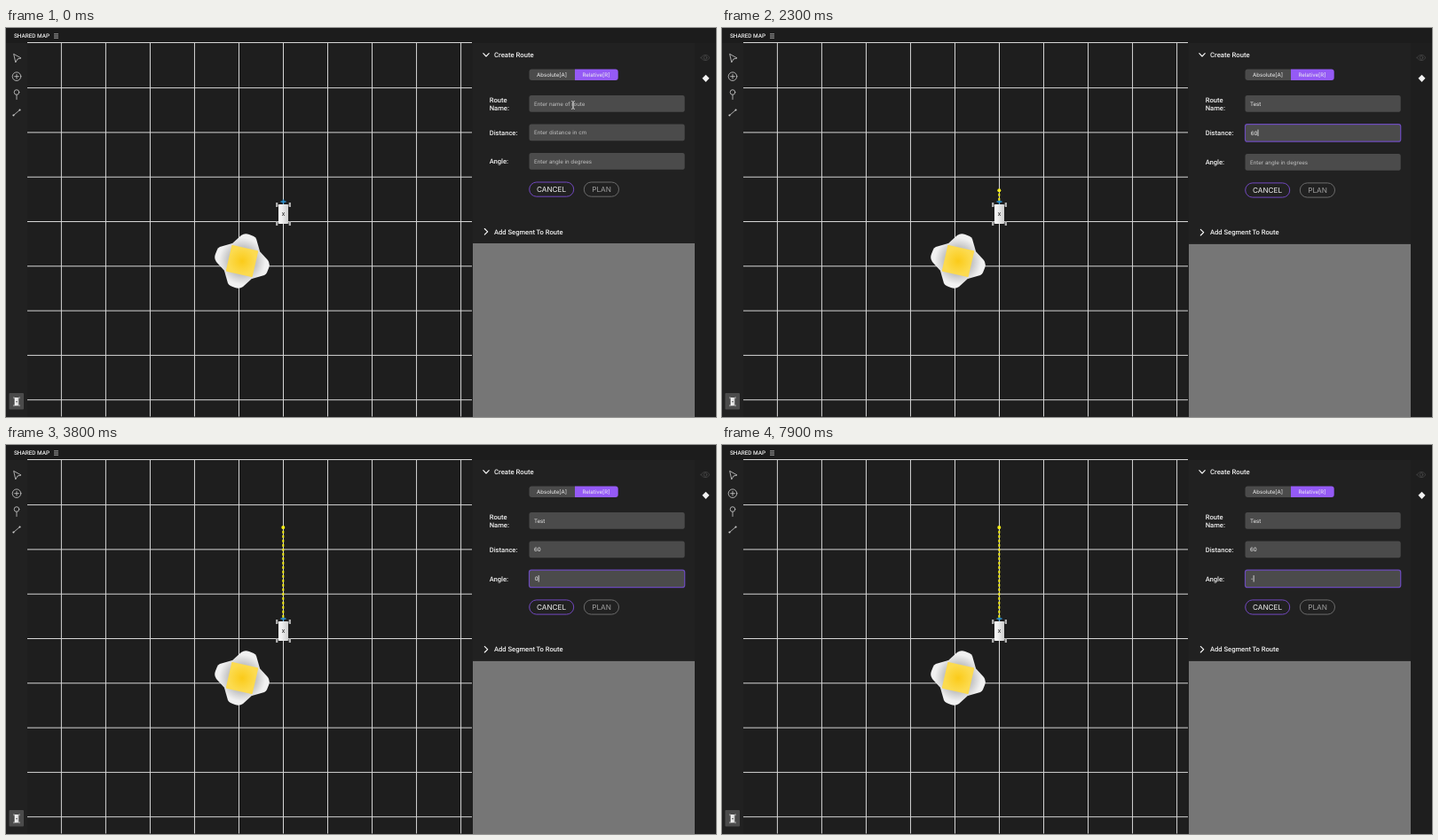
An HTML page that plays this animation: 800x439 px, repeating every 8000 ms.

```html
<!DOCTYPE html>
<html lang="en">
<head>
<meta charset="utf-8">
<title>Route planner</title>
<style>
  html, body { margin: 0; width: 100%; height: 100%; overflow: hidden; background: #1c1c1c; }
  svg { display: block; width: 100vw; height: 100vh; }
  text { fill: #f0f0f0; font: 500 7.6px Roboto, sans-serif; white-space: pre; text-rendering: geometricPrecision; }
  .entry { font: 400 6.15px Inter, sans-serif; }
  .button { font: 400 8.2px Inter, sans-serif; text-anchor: middle; }
  .tab { font: 400 6.1px Inter, sans-serif; text-anchor: middle; }
  .icon { fill: none; stroke: #d0d0d0; stroke-width: .8; stroke-linecap: round; stroke-linejoin: round; }
</style>
</head>
<body>
<svg viewBox="0 0 800 439" preserveAspectRatio="none">
  <defs>
    <radialGradient id="petal" gradientUnits="userSpaceOnUse" cx="0" cy="0" r="31">
      <stop offset=".45" stop-color="#bcbcbc"/><stop offset=".85" stop-color="#f1f1f1"/>
    </radialGradient>
    <radialGradient id="yolk"><stop stop-color="#fbcb19"/><stop offset="1" stop-color="#fcdb50"/></radialGradient>
    <linearGradient id="metal"><stop stop-color="#fff"/><stop offset="1" stop-color="#cfcfcf"/></linearGradient>
    <g id="robot">
      <path d="M-7 -10H7M-7 10H7" stroke="#999"/>
      <path d="M-7.3 -13v5M7.3 -13v5M-7.3 8v5M7.3 8v5" stroke="#b4b4b4" stroke-width="2.2"/>
      <rect x="-5.5" y="-11" width="11" height="22" rx="1" fill="url(#metal)"/>
    </g>
    <path id="leaf" d="M-13 -18L-1 -29Q3 -32 8 -30L13 -28Q15 -27 16 -25L20 -11L0 0Z" fill="url(#petal)"/>
  </defs>

  <rect width="800" height="439" fill="#1c1c1c"/>
  <rect y="17" width="24" height="422" fill="#212121"/>
  <rect x="24" y="17" width="502" height="422" fill="#1e1e1e"/>

  <g id="map">
    <path id="grid" stroke="#d6d6d6" fill="none"/>
    <g transform="translate(266 263)">
      <use href="#leaf"/><use href="#leaf" transform="rotate(90)"/>
      <use href="#leaf" transform="rotate(180)"/><use href="#leaf" transform="rotate(270)"/>
      <rect x="-15.3" y="-15.3" width="30.6" height="30.6" rx="1" fill="url(#yolk)" transform="rotate(13)"/>
    </g>
    <path d="M309.5 196h6M312.5 193.5v5" stroke="#2f94d2" stroke-width="1.6"/>
    <use href="#robot" x="312.5" y="210"/>
    <text x="312.5" y="212" text-anchor="middle" style="font-size:5.5px;fill:#333">X</text>
    <g id="route" fill="#f6ee14">
      <line id="dash" stroke="#f6ee14" stroke-width="2" stroke-dasharray="3 2"/>
      <circle id="dot" r="2"/>
    </g>
  </g>

  <path d="M24 16.5H525" stroke="#d6d6d6"/>
  <rect x="525.5" y="17" width="251" height="422" fill="#212121"/>
  <rect x="776" y="17" width="24" height="422" fill="#1e1e1e"/>
  <text x="9" y="11.3" style="font-size:6.4px">SHARED MAP</text>
  <path d="M54 6.8h5M54 9h5M54 11.2h5" stroke="#ccc" stroke-width=".8"/>

  <g class="icon">
    <path d="M9 29.5L17 34L13 35L11 38.5Z"/>
    <circle cx="12" cy="54.7" r="4.8"/><path d="M9.6 54.7h4.8M12 52.3v4.8"/>
    <circle cx="12" cy="72.5" r="2.8"/><path d="M12 75.5v5"/>
    <path d="M8.5 98.5L15.5 92.5"/><path d="M8.4 98.6h.1M15.5 92.5h.1" stroke-width="2"/>
    <path d="M783 33.5Q788 27 793 33.5Q788 40 783 33.5Z" stroke="#484848"/>
    <circle cx="788" cy="33.5" r="1.8" stroke="#484848"/>
  </g>
  <path d="M788.5 52.7l4 4.1l-4 4.1l-4 -4.1z" fill="#f2f2f2"/>
  <rect x="3.5" y="412" width="16.5" height="18.5" rx="1" fill="#4b4b4b"/>
  <use href="#robot" transform="translate(12 421.7) scale(.42)"/>
  <circle cx="12" cy="421.7" r=".8" fill="#444"/>

  <path class="icon" d="M537.8 28.7L541 32L544.2 28.7" style="stroke:#fff;stroke-width:1.1"/>
  <text x="550" y="33" style="font-size:7.7px">Create Route</text>
  <path d="M641 46.5H592.5a3 3 0 0 0-3 3v6.4a3 3 0 0 0 3 3H641z" fill="#4b4b4b"/>
  <path d="M641 46.5h45.7a3 3 0 0 1 3 3v6.4a3 3 0 0 1-3 3H641z" fill="#955af6"/>
  <text class="tab" x="615" y="54.9">Absolute[A]</text>
  <text class="tab" x="665" y="54.9">Relative[R]</text>

  <g id="rows"></g>
  <g id="foot">
    <rect x="589.7" y="174" width="50" height="16.2" rx="8.1" fill="none" stroke="#7248c0"/>
    <text class="button" x="614.5" y="185.2">CANCEL</text>
    <rect id="planBox" x="651.3" y="174" width="39.2" height="16.2" rx="8.1" fill="none"/>
    <text id="plan" class="button" x="671" y="185.2">PLAN</text>
    <path class="icon" d="M539.3 226.5L542.7 229.8L539.3 233.1" style="stroke:#fff;stroke-width:1.1"/>
    <text x="550" y="232.6">Add Segment To Route</text>
    <rect x="526" y="243" width="250" height="200" fill="#767676"/>
  </g>
  <path id="caret" stroke="#f4f4f4" stroke-width=".8"/>
  <path id="beam" d="M-2 -4.5Q0 -4.5 0 -3V3Q0 4.5 -2 4.5M2 -4.5Q0 -4.5 0 -3V3Q0 4.5 2 4.5" fill="none" stroke="#c9c9c9" stroke-width=".9"/>
  <path id="arrow" d="M0 0V8L1.9 6.3L3.2 9L4.5 8.4L3.3 5.8H5.8Z" fill="#080808" stroke="#ddd" stroke-width=".7"/>
</svg>

<script>
const LOOP = 8000;
const $ = id => document.getElementById(id);
const set = (el, attrs) => { for (const k in attrs) el.setAttribute(k, attrs[k]); };
const at = (steps, t) => steps.filter(s => s[0] <= t).pop()[1];

// Each list holds [start time, value]
const focusSteps = [[0, -1], [100, 0], [2000, 1], [2800, 2]];
const typed = [
  [[0, ''], [500, 'T'], [600, 'Te'], [700, 'Tes'], [800, 'Test']],
  [[0, ''], [2200, '6'], [2300, '60']],
  [[0, ''], [2900, '3'], [3200, '30'], [3600, '3'], [3800, '0'], [4000, '3'], [4200, '39'],
   [6000, '3'], [6400, '0'], [7000, ''], [7900, '-']]
];
const lengths = [[0, 0], [2300, 11.5], [2400, 101.8]];
const angles = [[0, 0], [3000, 3], [3200, 30], [3600, 3], [3800, 0], [4000, 3], [4200, 39], [6000, 3], [6400, 0]];
const planReady = [[0, false], [2900, true], [3800, false], [4000, true], [6400, false], [7000, true], [7900, false]];
const caretSteps = [[0, true], [4500, false], [4900, true], [7500, false], [7900, true]];
const squeeze = [[0, 1], [200, .996], [2200, 1]];
// Pointer legs: [time, x, y], hidden between legs
const legs = [
  [[0, 639, 87], [500, 639, 87]],
  [[900, 637, 101], [1000, 631, 121.5], [1400, 631, 121.5], [1700, 629, 126], [2200, 629, 126]],
  [[4900, 629, 126], [5300, 590.5, 128], [5500, 597, 151], [5700, 597, 151]]
];

let grid = '';
for (let i = 0; i < 10; i++) grid += `M${62.4 + 50.02 * i} 17V438.5`;
for (let i = 0; i < 8; i++) grid += `M24 ${67.6 + 50.3 * i}H525`;
$('grid').setAttribute('d', grid);

const rows = [
  [['Route', 'Name:'], 'Enter name of route'],
  [['Distance:'], 'Enter distance in cm'],
  [['Angle:'], 'Enter angle in degrees']
].map(([label, hint], i) => {
  const y = 85.4 + 32.5 * i, g = document.createElementNS('http://www.w3.org/2000/svg', 'g');
  g.innerHTML = label.map((word, k) =>
    `<text x="544.7" y="${y + 2.8 + (k - (label.length - 1) / 2) * 9}">${word}</text>`).join('') +
    `<rect x="589.5" width="175.2" rx="2.5" fill="#4b4b4b"/><text class="entry" y="${y + 2.4}"></text>`;
  $('rows').append(g);
  return { g, y, hint, box: g.querySelector('rect'), entry: g.querySelector('.entry') };
});

function pointer(t) {
  const leg = legs.find(l => t >= l[0][0] && t < l[l.length - 1][0]);
  if (!leg) return null;
  const i = leg.findIndex(p => p[0] > t), [a, b] = [leg[i - 1], leg[i]];
  const k = (t - a[0]) / (b[0] - a[0]);
  return [a[1] + (b[1] - a[1]) * k, a[2] + (b[2] - a[2]) * k];
}

function drawForm(t) {
  const focus = at(focusSteps, t);
  $('caret').setAttribute('d', '');
  rows.forEach((row, i) => {
    const on = i === focus, text = at(typed[i], t);
    const shift = on ? .4 : focus >= 0 && focus < i ? 1 : 0;
    const x = on ? 595.8 : 595;
    row.g.setAttribute('transform', `translate(0 ${shift})`);
    set(row.box, {
      y: row.y - (on ? 9.7 : 9.4), height: on ? 19.6 : 18.8,
      stroke: on ? '#6c4bbb' : 'none', 'stroke-width': 1.2
    });
    row.entry.textContent = text || row.hint;
    set(row.entry, { x, style: `fill:${text ? '#ececec' : '#c2c2c2'}` });
    if (on && at(caretSteps, t)) {
      const end = x + (text ? row.entry.getComputedTextLength() + .5 : -.2);
      $('caret').setAttribute('d', `M${end} ${row.y + shift - 3.7}v7.4`);
    }
  });
  $('foot').setAttribute('transform', `translate(0 ${focus < 0 ? 0 : .9})`);
  const ready = at(planReady, t);
  $('planBox').setAttribute('stroke', ready ? '#7248c0' : '#6b6b6b');
  $('plan').style.fill = ready ? '#f0f0f0' : '#a0a0a0';
}

function drawMap(t) {
  $('map').setAttribute('transform', `translate(0 17) scale(1 ${at(squeeze, t)}) translate(0 -17)`);
  const length = at(lengths, t), a = at(angles, t) * Math.PI / 180;
  const x = 312.3 + length * Math.sin(a), y = 194.8 - length * Math.cos(a);
  $('route').style.display = length ? '' : 'none';
  set($('dash'), { x1: 312.3, y1: 194.8, x2: x, y2: y });
  set($('dot'), { cx: x, cy: y });
}

function drawPointer(t) {
  const p = pointer(t);
  const inField = p && rows.some(r => Math.abs(p[1] - r.y - .4) < 9.5);
  $('beam').style.display = p && inField ? '' : 'none';
  $('arrow').style.display = p && !inField ? '' : 'none';
  if (p) for (const id of ['beam', 'arrow']) $(id).setAttribute('transform', `translate(${p})`);
}

function frame(now) {
  const t = now % LOOP;
  drawForm(t);
  drawMap(t);
  drawPointer(t);
  requestAnimationFrame(frame);
}
frame(0);
</script>
</body>
</html>
```
